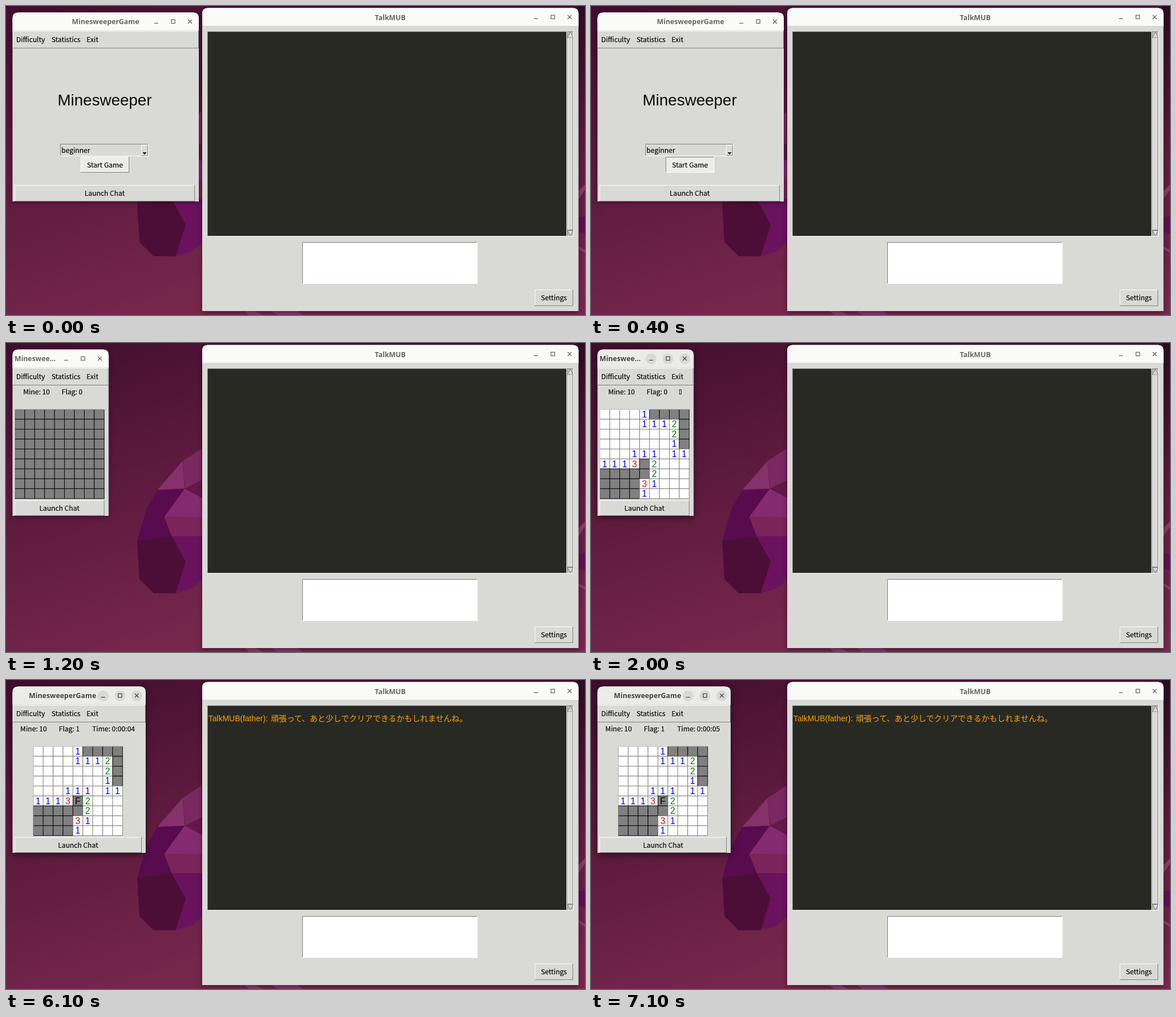
Write an HTML page that moves like this. It is 1024 px wide and 547 px high and loops after 8 s.

```html
<!DOCTYPE html>
<html lang="en">
<head>
<meta charset="utf-8">
<title>Minesweeper with chat</title>
<style>
  html, body { margin: 0; width: 100%; height: 100%; overflow: hidden; background: #5c1a3d; }
  svg { display: block; width: 100vw; height: 100vh; }
  text { white-space: pre; }
  .ui { font: 500 12.2px "Noto Sans CJK JP", "Noto Sans CJK", sans-serif; fill: #0c0c0c; stroke: #0c0c0c; stroke-width: .22px; }
  .title { font: 700 12.4px "Noto Sans", "Open Sans", sans-serif; }
  .big { font: 28px "Liberation Sans", sans-serif; }
  .digit { font: 16px "Liberation Sans", sans-serif; }
  .chat { font: 14px "Liberation Sans", sans-serif; fill: #ffa500; }
  .ja { font-family: "Noto Sans CJK JP", "Noto Sans CJK", sans-serif; }
  .idle { filter: drop-shadow(0 2px 4px rgba(0, 0, 0, .38)); }
  .focused { filter: drop-shadow(0 3px 6px rgba(0, 0, 0, .55)); }
</style>
</head>
<body>
<svg id="stage" viewBox="0 0 1024 547" preserveAspectRatio="none">
  <defs>
    <linearGradient id="sky" gradientUnits="userSpaceOnUse" x1="0" y1="0" x2="180" y2="547">
      <stop offset="0" stop-color="#410d2e"/>
      <stop offset=".5" stop-color="#5c1a3d"/>
      <stop offset="1" stop-color="#74264b"/>
    </linearGradient>
    <linearGradient id="edge" x2="0" y2="1">
      <stop offset="0" stop-color="#2e0a24"/>
      <stop offset=".5" stop-color="#601b40"/>
      <stop offset="1" stop-color="#7a2750"/>
    </linearGradient>
  </defs>
</svg>
<script>
const LOOP = 8000;
const BG = '#d9dad6', HOVER = '#ececea', LIGHT = '#fdfdfc', DARK = '#81827f';
const CELL = 17.55, BOARD_TOP = 117.5;
const DIGIT_COLORS = { 1: '#0000ff', 2: '#008000', 3: '#ff0000', F: '#000' };
const BOT = 'TalkMUB';

const OPENED = [
  '....1####', '....1112#', '.......2#', '.......1#', '...111.11',
  '1113#2...', '#####2...', '####31...', '####1....'
];
const CLOSED = Array(9).fill('#########');
const FLAGGED = OPENED.map((row, i) => i === 5 ? row.replace('#', 'F') : row);

const rect = (x, y, w, h, fill, extra = '') =>
  `<rect x="${x}" y="${y}" width="${w}" height="${h}" fill="${fill}" ${extra}/>`;
const poly = (points, fill, extra = '') => `<polygon points="${points}" fill="${fill}" ${extra}/>`;
const text = (x, y, str, cls = 'ui', anchor = 'start', extra = '') =>
  `<text x="${x}" y="${y}" class="${cls}" text-anchor="${anchor}" ${extra}>${str}</text>`;

function bevel(x, y, w, h, fill = BG, sunken = false) {
  const [a, b] = sunken ? [DARK, LIGHT] : [LIGHT, DARK];
  return rect(x, y, w, h, fill) +
    rect(x, y, w, 1, a) + rect(x, y, 1, h, a) +
    rect(x, y + h - 1, w, 1, b) + rect(x + w - 1, y, 1, h, b);
}

const button = (x, y, w, h, label, fill, sunken) =>
  bevel(x, y, w, h, fill, sunken) + text(x + w / 2, y + h / 2 + 4.8, label, 'ui', 'middle');

function frame(x, y, right, bottom, focused) {
  const w = right - x, cy = y + 16.5, ink = focused ? '#3a3a3a' : '#555553';
  const [min, max, close] = [75.3, 45.4, 15.8].map(d => right - d);
  const discs = focused
    ? [min, max, close].map(cx => `<circle cx="${cx}" cy="${cy}" r="9.6" fill="#d8d8d6"/>`).join('') : '';
  return `<path class="${focused ? 'focused' : 'idle'}" fill="${BG}"
      d="M${x} ${bottom}V${y + 10}q0-10 10-10H${right - 10}q10 0 10 10V${bottom}z"/>
    <path fill="${focused ? '#ebebe9' : '#fafaf8'}"
      d="M${x} ${y + 32}V${y + 10}q0-10 10-10H${right - 10}q10 0 10 10V${y + 32}z"/>
    ${rect(x, y + 32, w, 1, '#cfcfcb')}${discs}
    <g fill="none" stroke="${ink}" stroke-width="1.1">
      <path d="M${min - 3.5} ${cy + 2.5}h7"/>
      <rect x="${max - 3.2}" y="${cy - 3.7}" width="6.4" height="6.4"/>
      <path d="M${close - 3.3} ${cy - 3.8}l6.8 6.8m0-6.8l-6.8 6.8"/>
    </g>`;
}

function board(left, rows) {
  let out = '';
  rows.forEach((row, r) => [...row].forEach((c, i) => {
    const x = left + i * CELL, y = BOARD_TOP + r * CELL;
    const closed = c === '#' || c === 'F';
    out += rect(x, y, CELL, CELL, closed ? '#808080' : '#fff',
      `stroke="${closed ? '#0a0a0a' : '#858585'}" stroke-width="1"`);
    if (DIGIT_COLORS[c])
      out += text(x + CELL / 2 - .2, y + 14.3, c, 'digit', 'middle', `fill="${DIGIT_COLORS[c]}"`);
  }));
  // The canvas cuts off the outer half of the first outlines.
  return out + rect(left - 1, BOARD_TOP - 1, 1.2, 9 * CELL + 2, BG) +
    rect(left - 1, BOARD_TOP - 1, 9 * CELL + 2, 1.2, BG);
}

function gameWindow(right, bottom, focused, content) {
  const title = right < 200
    ? text(15, 32.3, 'Mineswee…', 'title', 'start', `fill="${focused ? '#454545' : '#666664'}"`)
    : text(right > 300 ? 176 : 100, 32.3, 'MinesweeperGame', 'title', 'middle',
      `fill="${focused ? '#454545' : '#666664'}"`);
  return frame(11.5, 11.5, right, bottom, focused) + title +
    bevel(12, 44, right - 12, 31) +
    text(18, 64.3, 'Difficulty') + text(80.5, 64.3, 'Statistics') + text(142.5, 64.3, 'Exit') +
    content;
}

const menu = pressed => gameWindow(341, 346, false,
  text(174.5, 176.3, 'Minesweeper', 'big', 'middle', 'fill="#0a0a0a"') +
  bevel(96, 244, 156, 22, BG, true) + text(98, 260, 'beginner') +
  bevel(239, 246, 12, 19) + poly('241.5,259 248.5,259 245,263', '#000') +
  button(132, 267, 86, 28, 'Start Game', HOVER, pressed) +
  button(15, 317, 319, 29, 'Launch Chat'));

const smallGame = ({ rows, focused, hover, clippedTimer }) => gameWindow(181.5, 306, focused,
  text(30.5, 90.7, 'Mine: 10') + text(98.5, 90.7, 'Flag: 0') +
  (clippedTimer ? rect(156.5, 82.5, 3, 8, 'none', 'stroke="#222" stroke-width="1"') : '') +
  board(15.7, rows) + button(15, 278, 159, 28, 'Launch Chat', hover ? HOVER : BG));

const wideGame = (rows, flags, seconds) => gameWindow(247, 306, true,
  text(25.3, 90.7, 'Mine: 10') + text(93.5, 90.7, `Flag: ${flags}`) +
  text(152.5, 90.7, `Time: 0:00:0${seconds}`) +
  board(48.2, rows) + button(15, 278, 225, 28, 'Launch Chat'));

const message = text(358, 73, `${BOT}(father):`, 'chat') +
  text(468.5, 73, '頑張って、あと少しでクリアできるかもしれませんね。', 'chat ja');

const wallpaper = rect(0, 0, 1024, 547, 'url(#sky)') +
  rect(346, 0, 678, 6, '#471032') + rect(1010, 0, 14, 547, 'url(#edge)') +
  poly('346,187 312,209 317,258 346,243', '#7b2760') +
  poly('312,209 268,260 316,258', '#85326a') +
  poly('316,258 346,243 346,275', '#641848') +
  poly('268,260 316,258 280,308 293,342 232,350 239,325 249,293', '#590b4f') +
  poly('316,258 348,275 348,309 280,308', '#852a71') +
  poly('280,308 348,309 348,342 293,342', '#7a2459') +
  poly('293,342 348,342 348,417 330,434 300,443 318,387', '#6a125e') +
  poly('293,342 318,387 300,443 261,443 236,418 232,350', '#4c0e37') +
  poly('1012,328 1024,316 1024,325 1012,343', '#8a3a68') +
  poly('1012,374 1024,372 1024,403 1012,399', '#5f1055') +
  poly('1012,425 1024,432 1024,437 1012,430', '#8a3a68') +
  poly('422,540 440,540 455,547 430,547', '#8a3a69') +
  poly('470,540 515,540 525,547 480,547', '#85356a');

const chatWindow = frame(347, 3.5, 1012.5, 540, false) +
  text(679.5, 24.5, BOT, 'title', 'middle', 'fill="#666664"') +
  bevel(356, 45, 636, 363, '#282923', true) +
  bevel(992, 45, 12, 363, '#b9bab6', true) + bevel(993, 56, 10, 341) +
  poly('998,46 993,56 1003,56', BG, `stroke="${DARK}"`) +
  poly('993,397.5 1003,397.5 998,407', BG, `stroke="${DARK}"`) +
  bevel(524, 418, 310, 74, '#fff', true) +
  button(935, 502, 68, 29, 'Settings');

const scenes = [
  [0, menu(false)],
  [400, menu(true)],
  [500, smallGame({ rows: CLOSED, hover: true })],
  [1200, smallGame({ rows: CLOSED })],
  [2000, smallGame({ rows: OPENED, focused: true, clippedTimer: true })],
  [2100, wideGame(OPENED, 0, 0)],
  [6100, wideGame(FLAGGED, 1, 4) + message],
  [7100, wideGame(FLAGGED, 1, 5) + message]
];

const stage = document.getElementById('stage');
stage.insertAdjacentHTML('beforeend', wallpaper + chatWindow +
  scenes.map(([, art]) => `<g class="scene" display="none">${art}</g>`).join(''));
const layers = [...stage.querySelectorAll('.scene')];
const start = performance.now();
let shown = -1;

function tick() {
  const time = (performance.now() - start) % LOOP;
  const current = scenes.filter(([from]) => from <= time).length - 1;
  if (current !== shown) {
    layers.forEach((layer, i) => layer.setAttribute('display', i === current ? 'inline' : 'none'));
    shown = current;
  }
  requestAnimationFrame(tick);
}
tick();
</script>
</body>
</html>
```
